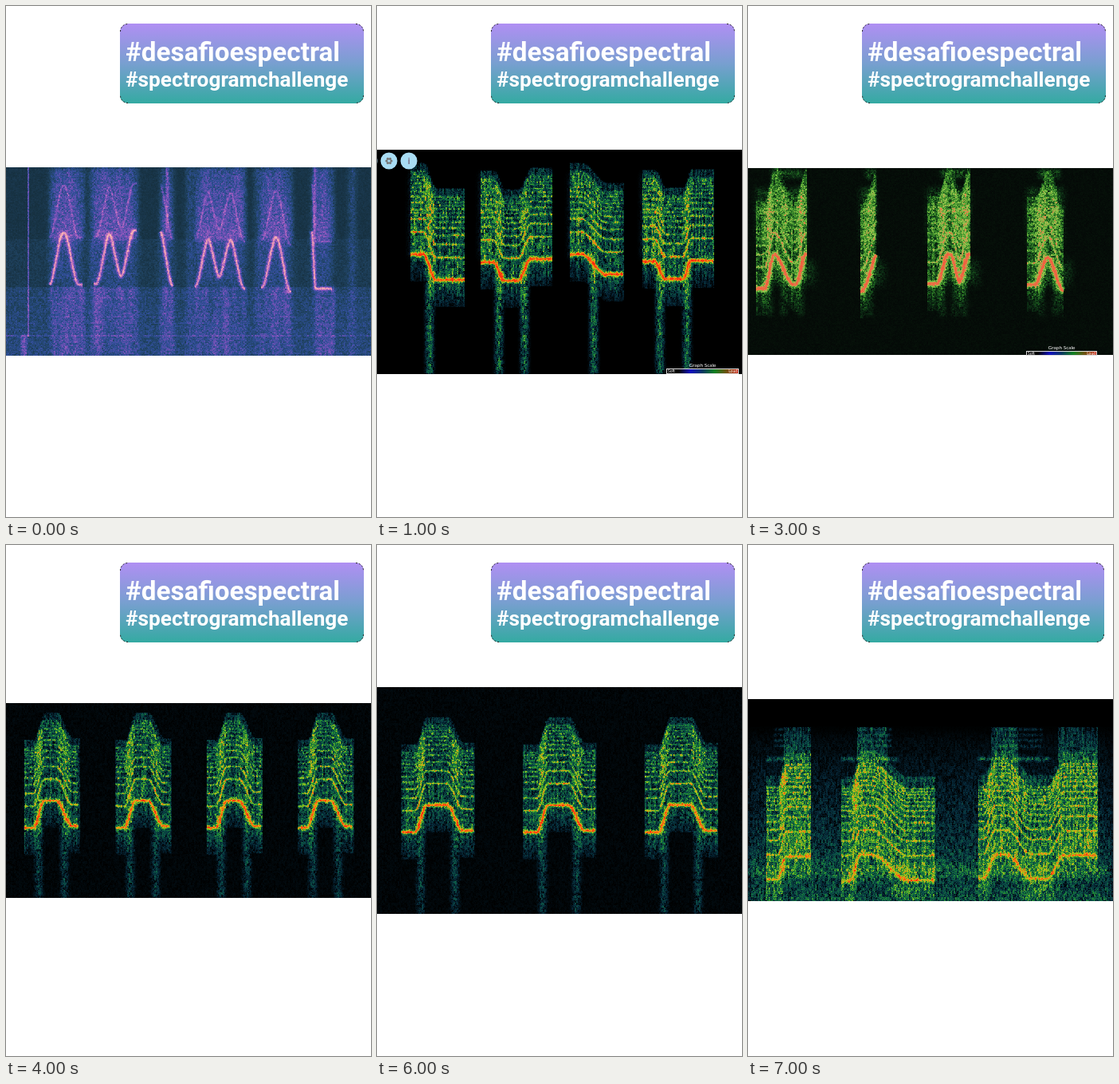
Recreate the animation shown at these times as an HTML page with a canvas. Size 458 px wide and 640 px high, loop 8 s.

```html
<!DOCTYPE html>
<html lang="es">
<head>
<meta charset="utf-8">
<title>Spectrogram slideshow</title>
<style>
  html, body { margin: 0; width: 100%; height: 100%; overflow: hidden; background: #fff; }
  canvas { display: block; width: 458px; height: 640px; }
</style>
</head>
<body>
<canvas id="stage" width="458" height="640"></canvas>
<script>
const W = 458, H = 640, HOLD = 1000;

// Evenly spaced colours from quiet to loud.
const PLASMA = ['#142c38', '#1f4260', '#2f4f98', '#6a50b4', '#a860c0', '#f0a0b0', '#ffe4c0'];
const HEAT = ['#000000', '#06283a', '#0c5848', '#1f8c34', '#8cc81e', '#f0a014', '#ff1e0f'];
const LEAF = ['#040806', '#0c2c14', '#1f6420', '#4ea030', '#94c850', '#e87848', '#f0583c'];
const JET = ['#00005a', '#0018c8', '#10b4f0', '#64e18c', '#e6e12d', '#ff8c00', '#d80000', '#b00000'];

function makeContext(w, h) {
  const canvas = document.createElement('canvas');
  canvas.width = w;
  canvas.height = h;
  return canvas.getContext('2d', { willReadFrequently: true });
}

function rand(x, y) {
  const s = Math.sin(x * 127.1 + y * 311.7) * 43758.5453;
  return s - Math.floor(s);
}

function ramp(c, colours, x1, y1, x2, y2) {
  const fill = c.createLinearGradient(x1, y1, x2, y2);
  colours.forEach((s, i) => fill.addColorStop(i / (colours.length - 1), s));
  return fill;
}

function lookup(colours) {
  const c = makeContext(256, 1);
  c.fillStyle = ramp(c, colours, 0, 0, 256, 0);
  c.fillRect(0, 0, 256, 1);
  return c.getImageData(0, 0, 256, 1).data;
}

// Loudness is drawn in grey on g, then grained and coloured.
let g;

function paint(c, x, y, w, h, { colours, base = 0, grain = 1.4, cell = [2, 3] }, draw) {
  g = makeContext(w, h);
  g.fillStyle = `rgb(${[base, base, base].map(v => v * 255)})`;
  g.fillRect(0, 0, w, h);
  g.globalCompositeOperation = 'screen';
  g.lineJoin = 'round';
  g.translate(-x, -y);
  draw();
  const img = g.getImageData(0, 0, w, h), d = img.data, lut = lookup(colours);
  for (let i = 0; i < d.length; i += 4) {
    const px = i / 4 % w, py = Math.floor(i / 4 / w);
    const n = rand(Math.floor(px / cell[0]), Math.floor(py / cell[1])) + rand(px + 500, py) - 1;
    const v = d[i] / 255, loud = v * (1 + grain * n * (1 - v));
    const k = 4 * Math.round(255 * Math.min(1, Math.max(0, loud)));
    for (let j = 0; j < 3; j++) d[i + j] = lut[k + j];
  }
  g.putImageData(img, 0, 0);
  c.drawImage(g.canvas, x, y);
}

function band(x, y, w, h, a0, a1 = a0, blur = 0) {
  g.filter = blur ? `blur(${blur}px)` : 'none';
  g.fillStyle = ramp(g, [`rgba(255,255,255,${a0})`, `rgba(255,255,255,${a1})`], 0, y, 0, y + h);
  g.fillRect(x, y, w, h);
  g.filter = 'none';
}

function trace(x1, x2, pitch, width, alpha) {
  g.beginPath();
  for (let x = x1; x <= x2; x++) g.lineTo(x, pitch(x));
  for (const [scale, share] of [[2.4, .25], [1.5, .4], [.8, .85]]) {
    g.lineWidth = width * scale;
    g.strokeStyle = `rgba(255,255,255,${alpha * share})`;
    g.stroke();
  }
}

// A call starts at height y and glides by dy around each step: [centre, dy, duration].
function call(x1, x2, y, ...steps) {
  const ease = t => t <= 0 ? 0 : t >= 1 ? 1 : t * t * (3 - 2 * t);
  const pitch = x => steps.reduce((sum, [at, dy, span = 18]) => sum + dy * ease((x - at) / span + .5), y);
  return { x1, x2, steps, pitch };
}

// Overtones sit on a logarithmic axis: octave and reach are in pixels.
function sing({ x1, x2, steps, pitch }, { octave, reach, loud, width, decay, haze = 0, tail = 0, floor = 0 }) {
  for (let x = x1; haze && x < x2; x += 2) {
    const a = haze * (.6 + .8 * rand(x, 1)), y = pitch(x);
    band(x, y - reach * 1.1, 2, reach * 1.1, a * .5, a);
    band(x, y, 2, 34, a * .9, a * .2);
  }
  for (const [at] of tail ? steps : []) {
    band(at - 4, pitch(at), 8, floor - pitch(at), tail, tail * .75, 2);
    band(at - 5, pitch(at) - reach * .8, 10, reach * .8, tail * .3, tail * .5, 2);
  }
  const count = Math.floor(2 ** (reach / octave));
  for (let k = 1; k <= count; k++) {
    trace(x1, x2, x => pitch(x) - octave * Math.log2(k), k > 1 ? width * .55 : width, loud * k ** -decay);
  }
}

function label(c, text, x, y, size, { align = 'center', font = 'Roboto, sans-serif', colour = '#fff', weight = 400, turn = 0 } = {}) {
  c.save();
  c.translate(x, y);
  c.rotate(turn);
  c.font = `${weight} ${size}px ${font}`;
  c.textAlign = align;
  c.fillStyle = colour;
  c.fillText(text, 0, 0);
  c.restore();
}

function rule(c, x1, y1, x2, y2, colour, width = 1) {
  c.strokeStyle = colour;
  c.lineWidth = width;
  c.beginPath();
  c.moveTo(x1, y1);
  c.lineTo(x2, y2);
  c.stroke();
}

function disc(c, x, y, r, colour) {
  c.fillStyle = colour;
  c.beginPath();
  c.arc(x, y, r, 0, Math.PI * 2);
  c.fill();
}

function legend(c, x, y, w, h) {
  c.fillStyle = ramp(c, ['#000', '#000', '#1010c0', '#083860', '#108020', '#705010', '#d02010'], x, 0, x + w, 0);
  c.fillRect(x, y, w, h);
  c.strokeStyle = '#ddd';
  c.lineWidth = 1;
  c.strokeRect(x + .5, y + .5, w - 1, h);
  const font = 'Lato, sans-serif';
  label(c, 'Graph Scale', x + w / 2, y - 2, 6.5, { font });
  label(c, 'Soft', x + 2, y + 5, 5, { font, align: 'left' });
  label(c, 'Loud', x + w - 2, y + 5, 5, { font, align: 'right' });
}

function tag(c, right) {
  const x = 143, y = 22, w = right - x, h = 100, r = 10;
  c.fillStyle = ramp(c, ['#b08ff3', '#789fd0', '#34aaa2'], 0, y, 0, y + h);
  c.beginPath();
  c.roundRect(x, y, w, h, r);
  c.fill();
  c.strokeStyle = '#222';
  c.lineWidth = 1;
  c.setLineDash([2, 2]);
  for (let i = 0; i < 4; i++) {
    const cx = i < 2 ? right - r : x + r, cy = i % 3 ? y + h - r : y + r;
    c.beginPath();
    c.arc(cx, cy, r - .5, (i - 1) * Math.PI / 2, i * Math.PI / 2);
    c.stroke();
  }
  c.setLineDash([]);
  label(c, '#desafioespectral', 150, 69, 33.25, { align: 'left', weight: 700 });
  label(c, '#spectrogramchallenge', 150, 101, 26.2, { align: 'left', weight: 700 });
}

function purpleCalls(c) {
  const calls = [
    call(55, 96, 350, [63, -66], [82, 65]),
    call(110, 164, 348, [122, -65], [137, 58], [152, -60]),
    call(194, 209, 280, [201, 72]),
    call(237, 300, 352, [246, -62], [261, 55], [274, -53], [290, 62]),
    call(320, 358, 352, [330, -62], [348, 68]),
    call(384, 409, 280, [386, 74, 5])
  ];
  paint(c, 0, 202, W, 236, { colours: PLASMA, base: .06, grain: .8, cell: [2, 2] }, () => {
    band(0, 292, W, 60, .05);
    band(0, 352, W, 86, .14, .2);
    for (let y = 357; y < 410; y += 8) band(0, y, W, 1, .1 * rand(y, 2));
    band(0, 412, W, 2, .14);
    for (const { x1, x2 } of calls) {
      band(x1 + 2, 202, x2 - x1 - 4, 92, .2, .3, 4);
      band(x1, 290, x2 - x1, 62, .24, .16, 4);
      for (let x = x1; x < x2; x += 4) {
        band(x, 202, 4, 90, .22 * rand(x, 3), .25, 2);
        band(x, 352, 4, 86, .4 * rand(x, 5), .34 * rand(x, 6), 2);
      }
    }
    for (const x of [105, 227, 313, 431]) band(x, 202, 7, 236, .25, .15, 3);
    band(27, 202, 2, 212, .38, .38, .7);
    band(19, 412, 7, 26, .35, .35, 1.5);
    band(201, 202, 3, 80, .4, .4, 1);
    band(386, 202, 3, 80, .4, .4, 1);
    calls.forEach(p => sing(p, { octave: 59, reach: 59, loud: .62, width: 3, decay: 1.5 }));
  });
}

function fourCalls(c) {
  const voice = { octave: 28, reach: 104, loud: .93, width: 3.8, decay: .7, haze: .3, tail: .4, floor: 461 };
  paint(c, 0, 180, W, 281, { colours: HEAT, grain: 1.7, cell: [2, 4] }, () => {
    [
      call(42, 110, 311, [66, 32, 16]),
      call(130, 220, 321, [153, 23, 14], [185, -27, 16]),
      call(242, 309, 311, [272, 25, 32]),
      call(333, 422, 320, [355, 22, 14], [389, -23, 10])
    ].forEach(p => {
      sing(p, voice);
      band(p.x1, 210, 18, 105, .12, .2, 3);
      trace(p.x1, p.x1 + 20, () => 259, 2, .25);
    });
  });
  for (const x of [-10, 15, 40]) disc(c, x, 194, 10.5, '#a9dcf3');
  for (let a = 0; a < 6; a++) disc(c, 15 + 3 * Math.cos(a * Math.PI / 3), 194 + 3 * Math.sin(a * Math.PI / 3), 1.6, '#777');
  label(c, 'i', 40, 198, 10, { colour: '#776a80', weight: 700 });
  legend(c, 363, 454, 91, 6);
}

function pulses(from, to, gap, loud) {
  band(from - 2, 94, to - from + 4, 408, loud * .4, loud * .5, 2);
  band(from - 4, 400, to - from + 8, 95, loud * .4, loud * .9, 4);
  for (let x = from; x <= to; x += gap) {
    const a = loud * (.6 + .6 * rand(x, 4));
    band(x - 1.2, 94, 2.4, 300, a * .7, a * .8, .6);
    band(x - 1.2, 394, 2.4, 108, a * .8, a * 1.2, .6);
  }
}

function axisChart(c) {
  const left = 57, top = 94, right = 415, bottom = 502;
  c.fillStyle = '#000';
  c.fillRect(2, 93, 454, 454);
  paint(c, left, top, right - left, bottom - top, { colours: JET, base: .06, grain: 1.1, cell: [1, 3] }, () => {
    const wobble = (x1, x2, y, amp, width, alpha) =>
      trace(x1, x2, x => y + amp * (Math.sin(x * .55) + Math.sin(x * 1.3)) / 2, width, alpha);
    band(left, top, 76, 408, .07, .1, 1);
    band(left, 205, 76, 65, .06, .04, 4);
    band(left, 285, 76, 92, .1, .22, 6);
    band(left, 338, 76, 28, .2, .2, 4);
    band(left, 445, 76, 48, .08, .08, 5);
    wobble(left, 132, 203, 5, 1.3, .2);
    wobble(left, 132, 352, 3, 2, .42);
    band(245, 300, 170, 195, 0, .16, 6);
    pulses(85, 95, 5, .28);
    pulses(164, 214, 4, .25);
    band(163, 418, 52, 72, .2, .2, 4);
    wobble(163, 215, 436, 3, 2, .3);
    pulses(272, 282, 5, .26);
    pulses(341, 351, 5, .26);
    pulses(379, 388, 4.5, .32);
    pulses(403, 403, 1, .2);
    for (let i = 0; i < 6; i++) {
      const x = 293 + i * 7.6, y = 320 + 65 * Math.sin(i * Math.PI / 5.5);
      band(x - 1.5, top, 3, 408, .1, .16, 1);
      band(x - 2, y - 28, 4, 30, .1, .45, 1.2);
      band(x - 2, y + 2, 4, 30, .45, .1, 1.2);
      band(x - 2, y + 68, 4, 32, .2, .1, 1.5);
    }
  });

  const grey = '#a0a0a0', grid = 'rgba(190,195,205,.5)', font = 'Liberation Sans, Arial, sans-serif';
  const style = { colour: grey, font };
  for (let i = 0; i < 8; i++) {
    const y = top + .5 + i * 51;
    label(c, String(8000 - i * 1000), 47, y + 8, 9.5, { ...style, align: 'right' });
    rule(c, 36, y, left, y, grey);
    if (i) rule(c, left, y, right, y, grid);
    for (let j = 1; j < 5; j++) rule(c, 51, y + j * 10.2, left, y + j * 10.2, grey);
  }
  rule(c, left, bottom + .5, right, bottom + .5, grey);
  for (let x = 64; x < right; x += 7) rule(c, x, bottom, x, bottom + 5, grey);

  const timeAxis = (start, first, last) => {
    for (let i = first; i <= last; i++) {
      const x = Math.floor(start + i * 55.9) + .5;
      rule(c, x, top, x, bottom, grid);
      rule(c, x, bottom, x, bottom + 22, grey);
      label(c, (i * 3.845).toFixed(1), x - 8, 521, 10, style);
    }
  };
  timeAxis(192, 1, 4);
  c.fillStyle = '#000';
  c.fillRect(226, 509, 14, 16);
  timeAxis(57, 0, 3);
  label(c, 'Time (seconds)', 183, 542, 11, style);
  label(c, 'Time (seconds)', 318, 542, 11, style);
  label(c, 'Frequency (Hz)', 23, 298, 10.5, { ...style, turn: -Math.PI / 2 });
  label(c, 'Scale (dBFS)', 426, 298, 10.5, { ...style, turn: -Math.PI / 2 });

  c.fillStyle = ramp(c, JET, 0, bottom, 0, top);
  c.fillRect(429, top, 15, bottom - top);
  for (let i = 1; i < 9; i++) label(c, String(-12 * i), 437, 103 + i * 51, 9.5, style);
  rule(c, 240.5, 93, 240.5, 547, '#f4f4f4', 3);
}

function greenCalls(c) {
  const voice = { octave: 27, reach: 100, loud: .85, width: 4.2, decay: .95, haze: .32, tail: .14, floor: 388 };
  paint(c, 0, 203, W, 234, { colours: LEAF, base: .02, grain: 1.3, cell: [2, 2] }, () => {
    [
      call(10, 74, 354, [27, -43, 12], [45, 38, 24], [66, -38, 12]),
      call(141, 161, 358, [153, -49, 22]),
      call(225, 279, 348, [244, -37, 14], [260, 35, 12], [271, -35, 12]),
      call(350, 396, 349, [368, -34, 16], [386, 42, 20])
    ].forEach(p => {
      const w = p.x2 - p.x1;
      sing(p, voice);
      band(p.x1, 228, w, 70, .16, .12, 3);
      band(p.x1, 253, w, 6, .16, .16, 2);
      band(p.x1 + w * .3, 205, w * .6, 12, .25, .1, 2);
      band(p.x1 + w * .3, 320, w * .7 + 10, 30, .16, .1, 4);
    });
  });
  legend(c, 349, 432, 89, 5);
}

function arches(c, y, h, count) {
  const voice = { octave: 27, reach: 100, loud: .85, width: 3.2, decay: .65, haze: .28, tail: .22, floor: y + h };
  const gap = W / count, low = y + h * .64;
  paint(c, 0, y, W, h, { colours: HEAT, base: .02, grain: 1.6 }, () => {
    for (let x = gap * .2; x < W; x += gap) {
      sing(call(x, x + gap * .6, low, [x + gap * .16, -34, 14], [x + gap * .44, 32, 20]), voice);
    }
  });
}

function steppedCalls(c) {
  const voice = { octave: 22.3, reach: 84, loud: .62, width: 2.6, decay: .32, haze: .2, tail: .12, floor: 410 };
  paint(c, 0, 229, W, 181, { colours: HEAT, grain: 1.7 }, () => {
    [
      call(26, 95, 357, [65, -43, 10]),
      call(130, 221, 314, [147, 43, 10], [198, -43, 10]),
      call(258, 320, 314, [274, 43, 14]),
      call(352, 386, 311, [359, 3, 8])
    ].forEach(p => {
      sing(p, voice);
      band(p.x1, 358, p.x2 - p.x1, 14, .16, .08, 3);
      // The upper notes ring louder than the lower ones.
      for (let x = p.x1; x < p.x2; x += 2) {
        if (p.pitch(x) > 320) continue;
        band(x, p.pitch(x) - 1.5, 2, 3, .5);
        band(x, p.pitch(x) - 23.5, 2, 2.5, .4);
      }
    });
    band(26, 262, 2, 94, .35, .35, .7);
  });
  const font = 'Noto Sans Mono, monospace';
  ['5024', '1262', '317', '80'].forEach((hz, i) => {
    const y = 247 + i * 44;
    label(c, `${hz} Hz`, 447, y + 2, 6, { align: 'right', font });
    rule(c, 451, y + .5, 458, y + .5, '#eee');
  });
  c.fillStyle = '#777';
  c.fillRect(443, 407, 15, 3);
}

function longCalls(c) {
  const voice = { octave: 31, reach: 118, loud: .56, width: 3.4, decay: .3, haze: .3 };
  paint(c, 0, 193, W, 253, { colours: HEAT, grain: 1.6, cell: [2, 4] }, () => {
    band(0, 235, W, 110, .02, .14, 6);
    band(0, 345, W, 70, .12, .25, 5);
    band(0, 400, W, 52, .1, .32, 6);
    [
      call(23, 79, 419, [43, -29, 10]),
      call(117, 234, 420, [135, -32, 12], [178, 32, 46]),
      call(289, 438, 418, [303, -30, 16], [340, 30, 30], [386, -29, 20])
    ].forEach(p => {
      sing(p, voice);
      for (let x = p.x1; x < p.x2; x += 2) {
        if (p.pitch(x) > 400) continue;
        band(x, 264, 2, 125, .16, .14);
        band(x, 228, 2, 36, .22 * rand(x, 7), .2);
      }
      const crown = (p.x2 - p.x1) * .6;
      for (let y = 230; y < 256; y += 7) band(p.x1 + crown * .3, y, crown * .6, 2, .18, .18, 1);
      band(p.x1, 266, crown, 4, .28, .28, 1.5);
    });
  });
}

const scenes = [
  purpleCalls, fourCalls, axisChart, greenCalls,
  c => arches(c, 198, 244, 4), steppedCalls, c => arches(c, 178, 284, 3), longCalls
];

const slides = scenes.map(draw => {
  const c = makeContext(W, H);
  c.fillStyle = '#fff';
  c.fillRect(0, 0, W, H);
  draw(c);
  tag(c, draw === longCalls ? 447 : 449);
  return c.canvas;
});

const stage = document.getElementById('stage').getContext('2d');

function tick() {
  const index = Math.floor(performance.now() / HOLD) % slides.length;
  stage.drawImage(slides[index], 0, 0);
  requestAnimationFrame(tick);
}
tick();
</script>
</body>
</html>
```
